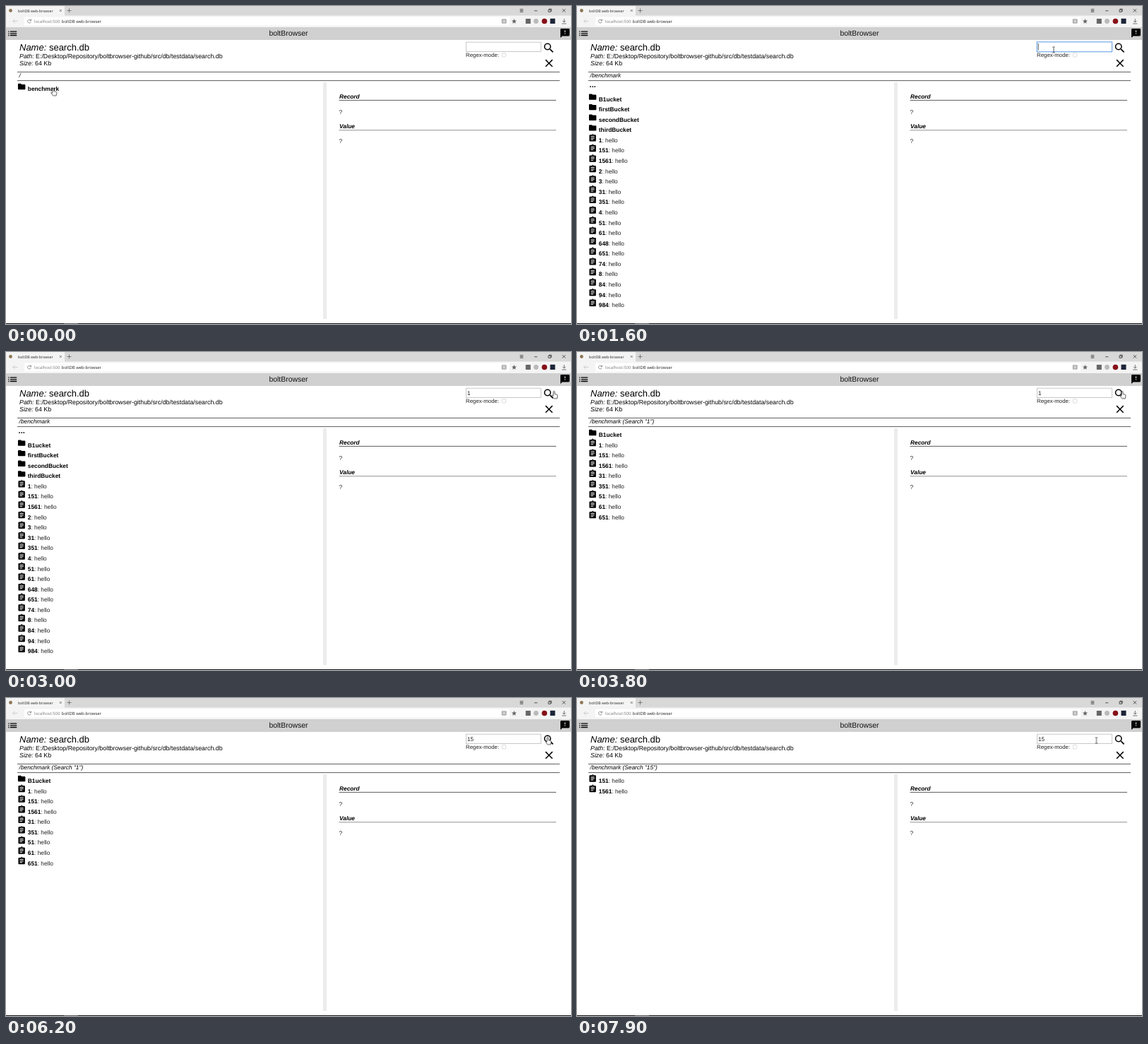
An HTML page for the animation above (8 s loop, 800 by 450 pixels).

```html
<!DOCTYPE html>
<html lang="en">
<head>
<meta charset="utf-8">
<title>boltDB web-browser</title>
<style>
html, body { margin: 0; width: 100%; height: 100%; overflow: hidden; background: #fff; }
svg { display: block; width: 100%; height: 100%; }
text { font: 8.33px "Liberation Sans", Arial, sans-serif; white-space: pre; text-rendering: geometricPrecision; }
.ui { font-family: "Open Sans", "Noto Sans", sans-serif; }
.b { font-weight: 700; }
.i { font-style: italic; }
.line { fill: none; stroke: #333; stroke-width: .8; }

/* 100 ms = 1.25% */
.on { animation: 8s step-end infinite; }
#root { animation-name: root; }
#bucket { animation-name: bucket; }
#one { animation-name: one; }
#fifteen { animation-name: fifteen; }
#focus { animation-name: focus; }
#digit1 { animation-name: digit1; }
#digit5 { animation-name: digit5; }
#caret { animation-name: caret; }
#hand { animation-name: hand; }
#arrow { animation-name: arrow; }
#beam { animation-name: beam; }
#cursor { animation: move 8s infinite; }

@keyframes root { 0% { opacity: 1 } 1.25%, 100% { opacity: 0 } }
@keyframes bucket { 0%, 38.75%, 100% { opacity: 0 } 1.25% { opacity: 1 } }
@keyframes one { 0%, 78.75%, 100% { opacity: 0 } 38.75% { opacity: 1 } }
@keyframes fifteen { 0% { opacity: 0 } 78.75%, 100% { opacity: 1 } }
@keyframes focus { 0%, 36.25%, 76.25%, 100% { opacity: 0 } 18.75%, 53.75% { opacity: 1 } }
@keyframes digit1 { 0% { opacity: 0 } 25%, 100% { opacity: 1 } }
@keyframes digit5 { 0% { opacity: 0 } 68.75%, 100% { opacity: 1 } }
@keyframes caret {
  0% { opacity: 0; transform: none }
  18.75% { opacity: 1; transform: none }
  25% { opacity: 1; transform: translateX(4.6px) }
  31.25% { opacity: 0; transform: translateX(4.6px) }
  53.75% { opacity: 1; transform: translateX(4.6px) }
  60% { opacity: 0; transform: translateX(4.6px) }
  67.5% { opacity: 1; transform: translateX(4.6px) }
  68.75% { opacity: 1; transform: translateX(9.2px) }
  75%, 100% { opacity: 0; transform: translateX(9.2px) }
}
@keyframes hand { 0%, 35%, 75% { opacity: 1 } 5%, 48.75%, 87.5%, 100% { opacity: 0 } }
@keyframes arrow { 0%, 17.5%, 100% { opacity: 0 } 5% { opacity: 1 } }
@keyframes beam { 0%, 35%, 75% { opacity: 0 } 17.5%, 48.75%, 87.5%, 100% { opacity: 1 } }
@keyframes move {
  0% { transform: translate(66.8px, 116.5px) }
  5% { transform: translate(66.8px, 116.5px); animation-timing-function: steps(9, start) }
  16.25% { transform: translate(672px, 86px); animation-timing-function: steps(2, start) }
  18.75%, 27.5% { transform: translate(675px, 62px); animation-timing-function: steps(8, start) }
  37.5%, 46.25% { transform: translate(776px, 55.5px); animation-timing-function: steps(2, start) }
  48.75% { transform: translate(772px, 55.5px); animation-timing-function: steps(4, start) }
  53.75%, 70% { transform: translate(711.5px, 58.5px); animation-timing-function: steps(5, start) }
  76.25%, 87.5% { transform: translate(767px, 55.5px); animation-timing-function: steps(2, start) }
  90%, 100% { transform: translate(735.5px, 60px) }
}
</style>
</head>
<body>
<svg viewBox="0 0 800 450" preserveAspectRatio="none">
  <defs>
    <path id="folder" d="M10 4H4c-1.1 0-2 .9-2 2v12c0 1.1.9 2 2 2h16c1.1 0 2-.9 2-2V8c0-1.1-.9-2-2-2h-8z"/>
    <path id="record" d="M19 3h-4.18C14.4 1.84 13.3 1 12 1s-2.4.84-2.82 2H5c-1.1 0-2 .9-2 2v14c0 1.1.9 2 2 2h14c1.1 0 2-.9 2-2V5c0-1.1-.9-2-2-2zm-7 0c.55 0 1 .45 1 1s-.45 1-1 1-1-.45-1-1 .45-1 1-1zm2 14H7v-2h7zm3-4H7v-2h10zm0-4H7V7h10z"/>
  </defs>
  <rect width="800" height="450" fill="#fff"/>

  <!-- browser window -->
  <rect width="800" height="14" fill="#d8d8d8"/>
  <rect width="83" height="14" fill="#f4f4f4"/>
  <rect y="13.5" width="800" height="16.5" fill="#f4f4f4"/>
  <rect x="26" y="15.5" width="687" height="12" fill="#fff"/>
  <circle cx="6.5" cy="6.5" r="2.4" fill="#8d7655"/>
  <text class="ui" x="17" y="8.6" style="font-size:5.2px" fill="#222">boltDB web-browser</text>
  <g class="line" stroke-width=".7">
    <path d="M75.8 5l3 3m0-3l-3 3M86.5 6.5h6m-3-3v6" stroke="#666"/>
    <path d="M727.7 4.7h4.6m-4.6 1.8h4.6m-4.6 1.8h4.6M748 6.8h4.4M768 5.2h3.2v3.2H768zm1-.1V4.2h3.2v3.2h-1M787.7 4.2l4.4 4.4m0-4.4l-4.4 4.4"/>
    <path d="M16.5 21.5H9.8l2.9-2.9m-2.9 2.9l2.9 2.9" style="stroke:#c4c4c4"/>
    <path d="M35.2 20.6a2.4 2.4 0 1 0 .1 1.8M35.5 18.6v2.1h-2.1" style="stroke:#777"/>
    <path d="M790.3 18v5m-2.2-2.1l2.2 2.2 2.2-2.2M787.2 25h6.2" style="stroke:#555"/>
  </g>
  <text class="ui" x="40" y="23.6" style="font-size:5.9px" fill="#777">localhost:500</text>
  <text class="ui" x="78.8" y="23.6" style="font-size:5.9px" fill="#222">boltDB web-browser</text>
  <rect x="701.8" y="18.3" width="6.8" height="6.4" rx="1" fill="#aaa"/>
  <path d="M703.4 20h3.6m-3.6 1.5h3.6m-3.6 1.5h3.6" stroke="#fff" stroke-width=".6"/>
  <path d="M719.5 18l1 2.4 2.5.2-1.9 1.7.6 2.5-2.2-1.4-2.2 1.4.6-2.5-1.9-1.7 2.5-.2z" fill="#666"/>
  <rect x="735.8" y="18" width="7" height="7" fill="#666"/>
  <circle cx="750.5" cy="21.5" r="3.4" fill="#b9b9b9"/>
  <circle cx="762.4" cy="21.5" r="3.8" fill="#861018"/>
  <rect x="770.5" y="17.8" width="7" height="7.2" fill="#1c2438"/>

  <!-- page header -->
  <rect y="30" width="800" height="18" fill="#d0d0d0"/>
  <path transform="translate(1.2 30.8) scale(.667)" d="M3 13h2v-2H3zm0 4h2v-2H3zm0-8h2V7H3zm4 4h14v-2H7zm0 4h14v-2H7zM7 7v2h14V7z"/>
  <text x="400" y="42" text-anchor="middle" style="font-size:10.45px" fill="#111">boltBrowser</text>
  <path transform="translate(783.7 30.7) scale(.65)" d="M20 2H4c-1.1 0-2 .9-2 2v18l4-4h14c1.1 0 2-.9 2-2V4c0-1.1-.9-2-2-2zm-7 12h-2v-2h2zm0-4h-2V6h2z"/>
  <text x="19" y="62.6" style="font-size:13px"><tspan class="i">Name:</tspan> search.db</text>
  <text x="19" y="73.8" style="font-size:8.84px"><tspan class="i">Path:</tspan> E:/Desktop/Repository/boltbrowser-github/src/db/testdata/search.db</text>
  <text x="19" y="84" style="font-size:8.84px"><tspan class="i">Size:</tspan> 64 Kb</text>
  <path class="line" d="M16 93.4h768M16 105.6h768"/>

  <!-- search form -->
  <rect x="651.4" y="51.2" width="106" height="13.4" fill="#fff" stroke="#bbb" stroke-width=".8"/>
  <rect id="focus" class="on" x="651.2" y="50.9" width="106.4" height="13.9" fill="#fff" stroke="#5b9be6" stroke-width="1"/>
  <text x="653" y="60.5" style="font-size:8.2px" fill="#222"><tspan id="d">&#8203;</tspan></text>
  <text id="digit1" class="on" x="653" y="60.5" style="font-size:8.2px" fill="#222">1</text>
  <text id="digit5" class="on" x="657.6" y="60.5" style="font-size:8.2px" fill="#222">5</text>
  <rect id="caret" class="on" x="652.8" y="53" width=".7" height="9.6" fill="#111"/>
  <text x="651" y="72.4" style="font-size:7.85px" fill="#222">Regex-mode:</text>
  <rect x="702.3" y="66.6" width="5.4" height="5.4" rx=".9" fill="#fff" stroke="#c4c4c4" stroke-width=".6"/>
  <path transform="translate(759.5 50.3) scale(.764)" d="M15.5 14h-.79l-.28-.27A6.47 6.47 0 0 0 16 9.5 6.5 6.5 0 1 0 9.5 16c1.61 0 3.09-.59 4.23-1.57l.27.28v.79l5 4.99L20.49 19zm-6 0a4.5 4.5 0 1 1 0-9 4.5 4.5 0 0 1 0 9z"/>
  <path transform="translate(759.7 71.8) scale(.764)" d="M19 6.41L17.59 5 12 10.59 6.41 5 5 6.41 10.59 12 5 17.59 6.41 19 12 13.41 17.59 19 19 17.59 13.41 12z"/>

  <!-- details -->
  <rect x="449" y="108" width="5" height="335" fill="#ececec"/>
  <text class="b i" x="472" y="131.2">Record</text>
  <path class="line" d="M471.5 133.4h307.5"/>
  <text x="471.6" y="152.6" fill="#222">?</text>
  <text class="b i" x="472" y="173">Value</text>
  <path class="line" d="M471.5 175.7h307.5" style="stroke:#777"/>
  <text x="471.6" y="194.2" fill="#222">?</text>

  <g id="root" class="on"></g>
  <g id="bucket" class="on"><text class="b" x="17.6" y="114.6" style="font-size:11px">...</text></g>
  <g id="one" class="on"></g>
  <g id="fifteen" class="on"></g>

  <rect y="449" width="800" height="1" fill="#111"/>
  <rect x="82" y="449" width="20" height="1" fill="#555"/>

  <g id="cursor">
    <path id="hand" class="on" d="M-1 1a1 1 0 0 1 2 0v3l3 .8q1.2.3 1 1.7l-.7 3.8h-4.6l-2.6-3.5q-.4-1.1.8-1.1l1.1.9z" fill="#fff" stroke="#111" stroke-width=".7"/>
    <path id="arrow" class="on" d="M0 0v9.2l2.1-2 1.5 3.4 1.4-.6-1.5-3.3h3z" fill="#fff" stroke="#111" stroke-width=".6"/>
    <path id="beam" class="on" d="M-1.7-4h1.2L0-3.6.5-4h1.2M0-3.6v7.2M-1.7 4h1.2L0 3.6.5 4h1.2" fill="none" stroke="#222" stroke-width=".75"/>
  </g>
</svg>
<script>
const STEP = 14.583;
const el = (tag, attrs, parent) => {
  const node = document.createElementNS('http://www.w3.org/2000/svg', tag);
  for (const key in attrs) node.setAttribute(key, attrs[key]);
  return parent.appendChild(node);
};

// Names made of digits are records, the others are buckets.
function fill(id, path, names, first = 0) {
  const group = document.getElementById(id);
  el('text', { class: 'i', x: 18.6, y: 101.3 }, group).textContent = path;
  names.split(' ').forEach((name, i) => {
    const y = (first + i) * STEP;
    const isRecord = /^\d+$/.test(name);
    el('use', {
      href: isRecord ? '#record' : '#folder',
      transform: `translate(15.9 ${107.75 + y}) scale(.521)`
    }, group);
    const text = el('text', { x: 30.8, y: 120 + y }, group);
    el('tspan', { class: 'b' }, text).textContent = name;
    if (isRecord) el('tspan', { fill: '#222' }, text).textContent = ': hello';
  });
}

document.getElementById('d').parentNode.remove();
fill('root', '/', 'benchmark');
fill('bucket', '/benchmark', 'B1ucket firstBucket secondBucket thirdBucket 1 151 1561 2 3 31 351 4 51 61 648 651 74 8 84 94 984', 1);
fill('one', '/benchmark (Search "1")', 'B1ucket 1 151 1561 31 351 51 61 651');
fill('fifteen', '/benchmark (Search "15")', '151 1561');
</script>
</body>
</html>
```
